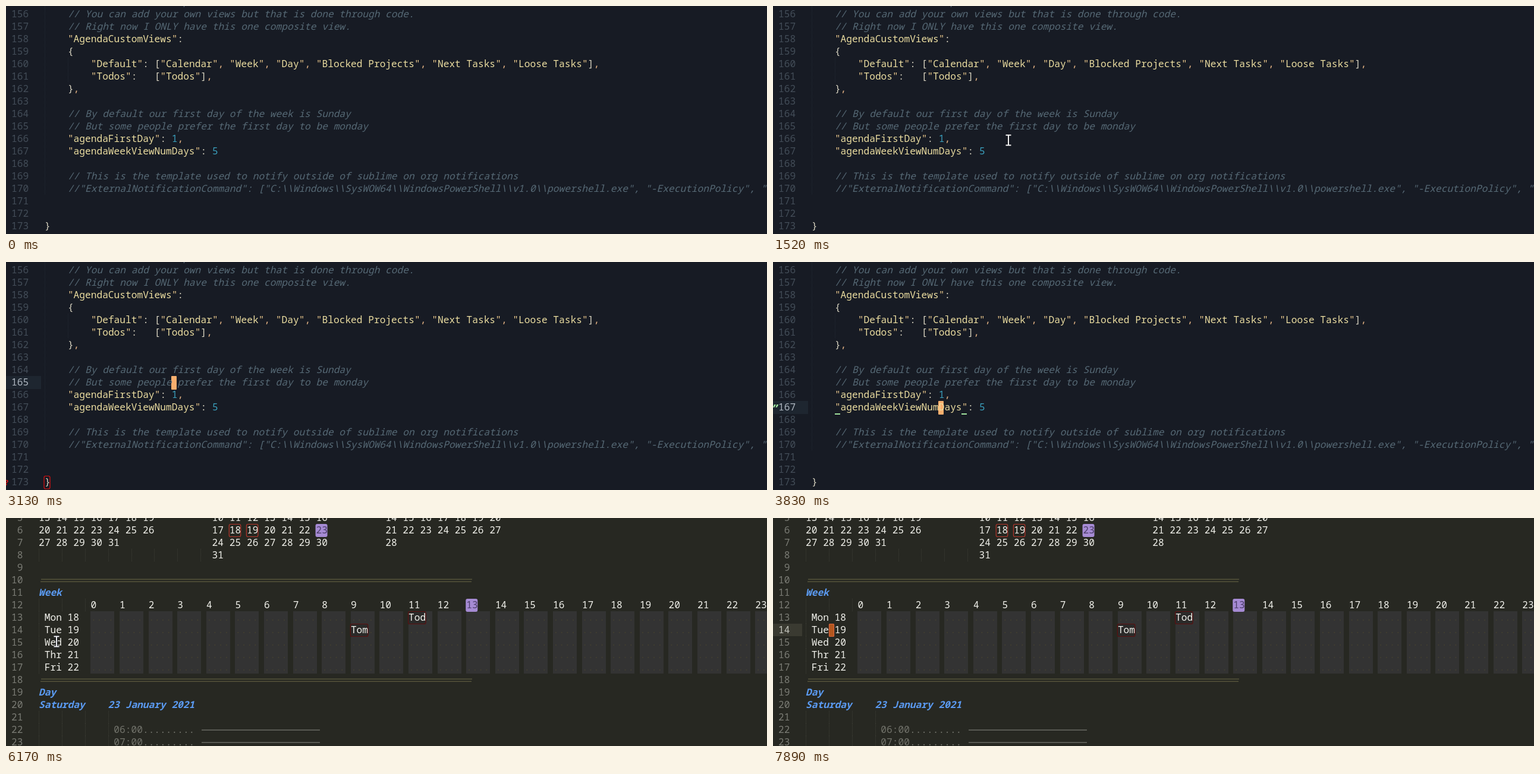
An HTML page with a canvas for the animation above (8000 ms loop, 1280 by 384 pixels).

```html
<!DOCTYPE html>
<html lang="en">
<head>
<meta charset="utf-8">
<title>Agenda settings</title>
<style>
  html, body { margin: 0; width: 100%; height: 100%; overflow: hidden; background: #171b24; }
  canvas { display: block; }
</style>
</head>
<body>
<canvas id="stage" width="1280" height="384"></canvas>
<script>
const ctx = document.getElementById('stage').getContext('2d');
const LOOP = 8000, SWITCH = 5390, ROW = 21, PITCH = 9.72;
const FAMILY = '16.2px "Noto Sans Mono", "DejaVu Sans Mono", monospace';
const PLAIN = '300 ' + FAMILY, ITALIC = 'italic 300 ' + FAMILY, BOLD = 'italic 700 ' + FAMILY;

function text(str, x, top, color, font = PLAIN) {
  ctx.font = font;
  ctx.fillStyle = color;
  ctx.fillText(str, x, top + 16);
}
function rect(x, y, w, h, color) {
  ctx.fillStyle = color;
  ctx.fillRect(x, y, w, h);
}
function box(x, y, w, h, fill, stroke, radius = 2.5) {
  ctx.beginPath();
  ctx.roundRect(x, y, w, h, radius);
  if (fill) { ctx.fillStyle = fill; ctx.fill(); }
  if (stroke) { ctx.strokeStyle = stroke; ctx.lineWidth = 1.2; ctx.stroke(); }
}
function guide(x, top, height, color) {
  for (let y = top; y < top + height; y += 2) rect(Math.round(x), y, 1, 1, color);
}

// The pointer glides from one place to another between two times.
const glide = (start, end, from, to) => ({ start, end, from, to });

function pointer(glides, t) {
  const move = glides.filter(g => g.start <= t).pop();
  if (!move) return;
  const p = Math.min(1, (t - move.start) / (move.end - move.start));
  const [x, y] = move.from.map((a, i) => Math.round(a + (move.to[i] - a) * p));
  for (const [color, width] of [['#10131a', 4], ['#f4f4f4', 2]]) {
    ctx.strokeStyle = color;
    ctx.lineWidth = width;
    ctx.beginPath();
    for (const end of [y - 8.5, y + 8.5]) {
      ctx.moveTo(x - 4.5, end);
      ctx.lineTo(x + 4.5, end);
    }
    ctx.moveTo(x, y - 8.5);
    ctx.lineTo(x, y + 8.5);
    ctx.stroke();
  }
}

/* Settings file */
const settings = String.raw`
    // You can add your own views but that is done through code.
    // Right now I ONLY have this one composite view.
    "AgendaCustomViews":
    {
        "Default": ["Calendar", "Week", "Day", "Blocked Projects", "Next Tasks", "Loose Tasks"],
        "Todos":   ["Todos"],
    },

    // By default our first day of the week is Sunday
    // But some people prefer the first day to be monday
    "agendaFirstDay": 1,
    "agendaWeekViewNumDays": 5

    // This is the template used to notify outside of sublime on org notifications
    //"ExternalNotificationCommand": ["C:\\Windows\\SysWOW64\\WindowsPowerShell\\v1.0\\powershell.exe", "-ExecutionPolicy", "


}`.slice(1).split('\n');
const FIRST = 156, CODE_X = 65, COMMENT = '#566975', CODE_GUIDE = '#222933';
const CLICK = 1840, KEY_UP = 3130, KEY_DOWN = 3220, KEY_DOWN_AGAIN = 3390, MATCH = 3830;
const codeTop = line => 3 + (line - FIRST) * ROW;

const codePointer = [
  glide(510, 690, [1080, 354], [826, 142]),
  glide(810, 970, [826, 142], [588, 233]),
  glide(970, 1130, [588, 233], [516, 235]),
  glide(1280, 1760, [516, 235], [277, 218])
];
const codeCaret = t => t < CLICK ? 0 :
  166 - (t >= KEY_UP) + (t >= KEY_DOWN) + (t >= KEY_DOWN_AGAIN);

function tokenColor(token) {
  if (token === '"') return '#eecb8e';
  if (token === ',') return '#e5b384';
  if (/[[\]{}:]/.test(token)) return '#dad5c2';
  return /^\d/.test(token) ? '#3a9fbc' : '#ebdda0';
}
function codeLine(line, top) {
  if (line.trim().startsWith('//')) {
    text(line.trim(), CODE_X + 4 * PITCH, top, COMMENT, ITALIC);
    return;
  }
  for (const m of line.matchAll(/["[\]{}:,]|\d+|[A-Za-z][A-Za-z ]*/g))
    text(m[0], CODE_X + m.index * PITCH, top, tokenColor(m[0]));
}

function drawSettings(t) {
  rect(0, 0, 1280, 384, '#171b24');
  guide(CODE_X, 0, codeTop(171), CODE_GUIDE);
  guide(CODE_X + 4 * PITCH, codeTop(160), 2 * ROW, CODE_GUIDE);
  text('p', CODE_X + 24 * PITCH, codeTop(155), COMMENT, ITALIC);

  const active = codeCaret(t);
  if (active) {
    rect(0, codeTop(active), 59, 22, '#1e2630');
    box(278, codeTop(active), 9, 23, '#f9af6e', null, 1);
  }
  settings.forEach((line, i) => {
    const number = FIRST + i, top = codeTop(number);
    text(number, 9, top, number === active ? '#aeb7c0' : '#434d58');
    codeLine(line, top);
  });

  if (t >= CLICK && t < MATCH) {
    box(64, codeTop(173) + 0.5, 10, 21.5, null, '#e01010');
    text('?', -3, codeTop(173), '#e01010', 'bold 13px "Noto Sans Mono", monospace');
  }
  if (t >= MATCH) {
    text('”', -1, codeTop(167) + 4, '#a3e6a0', 'italic 700 20px "Noto Sans", sans-serif');
    for (const x of [104, 317]) rect(x, 255, 9, 2, '#a3e6a0');
  }
  if (t < KEY_UP) pointer(codePointer, t);
}

/* Agenda */
const AGENDA_X = 55, WHITE = '#f2f2ec', BLUE = '#5b9bf3', AGENDA_GUIDE = '#3d3e36';
const AGENDA_CLICK = 7190, AGENDA_KEY = 7890;
const col = n => AGENDA_X + n * PITCH;
const agendaTop = line => 157 + (line - 13) * ROW;
const agendaText = (str, column, line, color = WHITE, font) =>
  text(str, col(column), agendaTop(line), color, font);

const agendaPointer = [
  glide(6020, 6170, [131, 216], [85, 208]),
  glide(6320, 6870, [85, 208], [97, 165]),
  glide(6870, 7110, [97, 165], [102, 164]),
  glide(7260, 7340, [102, 164], [88, 172])
];
const agendaCaret = t => t < AGENDA_CLICK ? 0 : 13 + (t >= AGENDA_KEY);

function guides(line, count) {
  for (let i = 0; i < count; i++) guide(col(4 * i), agendaTop(line), ROW, AGENDA_GUIDE);
}
function highlightNumber(str, column, line) {
  box(col(column) - 1, agendaTop(line), 20, 22, '#a68bd4', null, 3);
  agendaText(str, column, line, '#4b3d68');
}
function task(str, column, line) {
  box(col(column) - 0.5, agendaTop(line) + 0.5, 29.5, 21, '#2b2a29', '#5c1010');
  agendaText(str, column, line);
}
function separator(line) {
  const y = agendaTop(line) + 8.5;
  rect(59, y, 725, 1.5, '#55533a');
  rect(58, y + 4, 725, 1.5, '#55533a');
}
function month(column, firstDay, lastDay) {
  for (let day = firstDay; day <= lastDay; day++) {
    const i = day - firstDay;
    agendaText(day, column + (i % 7) * 3, 5 + Math.floor(i / 7));
  }
}

function drawCalendars() {
  guides(8, 8);
  month(0, 13, 31);
  month(30, 10, 31);
  month(60, 14, 28);
  for (const column of [33, 36])
    box(col(column) - 0.5, agendaTop(6) + 0.5, 19.5, 21, null, '#b5352b');
  highlightNumber('23', 48, 6);
}

function drawWeek() {
  agendaText('Week', 0, 11, BLUE, BOLD);
  guides(12, 3);
  for (let hour = 0; hour < 24; hour++) {
    const column = 9 + hour * 5;
    rect(Math.round(col(column)), agendaTop(13), 40, 5 * ROW, '#333333');
    for (let line = 13; line < 18; line++) agendaText('....', column, line, '#423f31');
    if (hour === 13) highlightNumber('13', column, 12);
    else agendaText(hour, column, 12);
  }
  ['Mon', 'Tue', 'Wed', 'Thr', 'Fri'].forEach((day, i) => {
    guides(13 + i, 1);
    agendaText(`${day} ${18 + i}`, 1, 13 + i);
  });
  task('Tod', 64, 13);
  task('Tom', 54, 14);
}

function drawDay() {
  agendaText('Day', 0, 19, BLUE, BOLD);
  agendaText('Saturday    23 January 2021', 0, 20, BLUE, BOLD);
  for (let line = 21; line < 24; line++) guides(line, 4);
  for (const line of [22, 23]) {
    agendaText(`0${line - 16}:00.........`, 13, line, '#72736b');
    rect(329, agendaTop(line) + 10.5, 199, 1.2, '#7a7b74');
  }
}

function drawAgenda(t) {
  rect(0, 0, 1280, 384, '#272822');
  const active = agendaCaret(t);
  if (active) rect(0, agendaTop(active), 49, ROW, '#3a3a31');
  for (let line = 5; line < 24; line++)
    text(String(line).padStart(2), 9, agendaTop(line), line === active ? '#c4c5bd' : '#7b7c75');
  drawCalendars();
  separator(10);
  drawWeek();
  separator(18);
  drawDay();
  if (active) box(94.5, agendaTop(active) + 0.5, 8, 21, '#b4571e', '#d9663f', 1);
  if (t < AGENDA_KEY) pointer(agendaPointer, t);
}

function frame() {
  const t = performance.now() % LOOP;
  (t < SWITCH ? drawSettings : drawAgenda)(t);
  requestAnimationFrame(frame);
}
frame();
</script>
</body>
</html>
```
